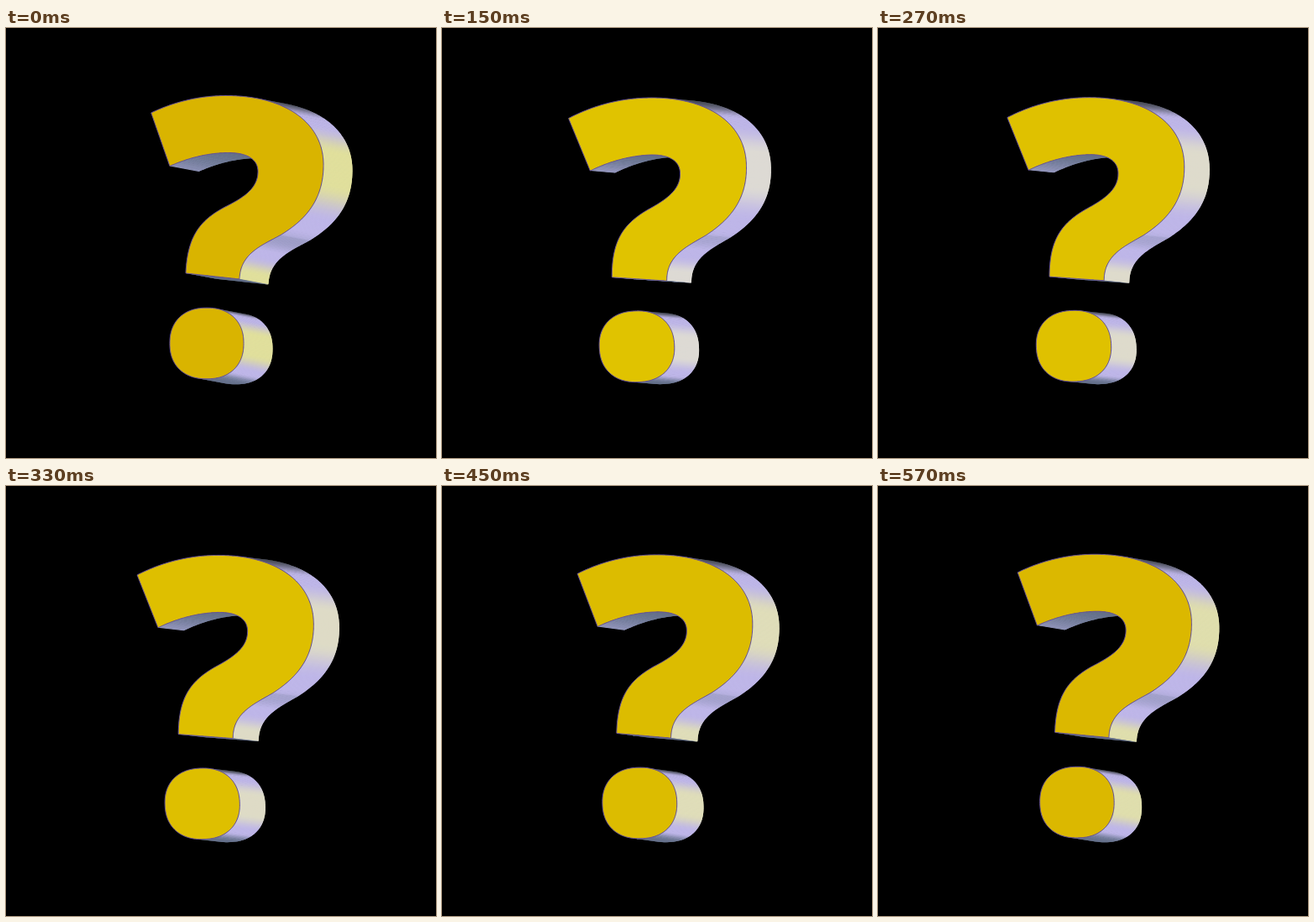
Animation, 512 px wide and 512 px high, one loop 0.6 s. Source, as an HTML page with a canvas:

```html
<!DOCTYPE html>
<html lang="en">
<head>
<meta charset="utf-8">
<title>Turning question mark</title>
<style>
html, body { margin: 0; height: 100%; overflow: hidden; background: #000; }
canvas { display: block; width: 100%; height: 100%; }
</style>
</head>
<body>
<canvas id="stage" width="512" height="512"></canvas>
<script>
const ctx = document.getElementById('stage').getContext('2d');

const hook = `M172.8 101 C200 88 230 80.5 262 80.5 C333 80.5 378 113 378 163
  C378 207 354 230 327 246.5 C303 259.5 279 269 278 299
  L214 292 C216 248 231 229 260 213.5 C283 202 300 191 300 171
  C300 155 285 148.5 265 148.5 C243 148.5 218 154 195 164.5 Z`;

const coolLight = [221, 218, 215], warmLight = [224, 223, 156];
const lavender = [190, 182, 232];
const topShade = [78, 82, 94], bottomShade = [108, 120, 148];
const coolFace = [224, 196, 0], warmFace = [217, 180, 0];

const mix = (a, b, k) => a + (b - a) * k;
const mixColor = (a, b, k) => a.map((v, i) => mix(v, b[i], k));
const css = color => `rgb(${color.map(Math.round)})`;
const ramp = (from, to, v) => {
  const k = Math.min(1, Math.max(0, (v - from) / (to - from)));
  return k * k * (3 - 2 * k);
};

// Both outlines run clockwise.
const outlines = [samplePath(hook, 700), superellipse(239, 375.5, 44, 42.3, 2.25, 240)];

function samplePath(d, count) {
  const path = document.createElementNS('http://www.w3.org/2000/svg', 'path');
  path.setAttribute('d', d);
  const length = path.getTotalLength();
  return Array.from({ length: count }, (_, i) => {
    const { x, y } = path.getPointAtLength(length * i / count);
    return [x, y];
  });
}

function superellipse(cx, cy, rx, ry, power, count) {
  const bend = v => Math.sign(v) * Math.abs(v) ** (2 / power);
  return Array.from({ length: count }, (_, i) => {
    const a = i / count * 2 * Math.PI;
    return [cx + rx * bend(Math.cos(a)), cy + ry * bend(Math.sin(a))];
  });
}

// tilt is the vertical part of the surface normal: -1 faces up, 1 down.
function sideColor(tilt, light) {
  const steep = Math.abs(tilt);
  const soft = mixColor(light, lavender, ramp(0.2, 0.7, steep));
  return css(mixColor(soft, tilt < 0 ? topShade : bottomShade, ramp(0.8, 1, steep)));
}

function trace(points) {
  ctx.beginPath();
  for (const [x, y] of points) ctx.lineTo(x, y);
  ctx.closePath();
}

// turn = 1 is the widest view of the side, 0 the narrowest.
function draw(turn) {
  const away = 1 - turn;
  const dx = mix(29, 34.5, turn), dy = mix(2.3, 6.5, turn);
  const light = mixColor(coolLight, warmLight, turn);
  const pose = ([x, y]) => [
    x + away * (0.017 * x + 0.054 * y - 31.7),
    y + away * (14.7 - 0.045 * x)
  ];

  ctx.fillStyle = '#000';
  ctx.fillRect(0, 0, 512, 512);

  for (const outline of outlines) {
    const face = outline.map(pose);
    const at = i => face[i % face.length];

    face.forEach(([x0, y0], i) => {
      const [x1, y1] = at(i + 1);
      const nx = y1 - y0, ny = x0 - x1;
      if (nx * dx + ny * dy <= 0) return;
      // Each strip reaches under the next one, which hides the seams.
      const [x2, y2] = at(i + 2);
      ctx.fillStyle = sideColor(ny / Math.hypot(nx, ny), light);
      trace([[x0, y0], [x2, y2], [x2 + dx, y2 + dy], [x0 + dx, y0 + dy]]);
      ctx.fill();
    });

    trace(face);
    ctx.fillStyle = css(mixColor(coolFace, warmFace, turn));
    ctx.fill();
    ctx.strokeStyle = '#6450a0';
    ctx.stroke();
  }
}

function tick() {
  const step = Math.floor(performance.now() % 600 / 30);
  draw(step ? 0.5 - 0.5 * Math.cos(0.1125 * (step - 1)) : 1);
  requestAnimationFrame(tick);
}
tick();
</script>
</body>
</html>
```
